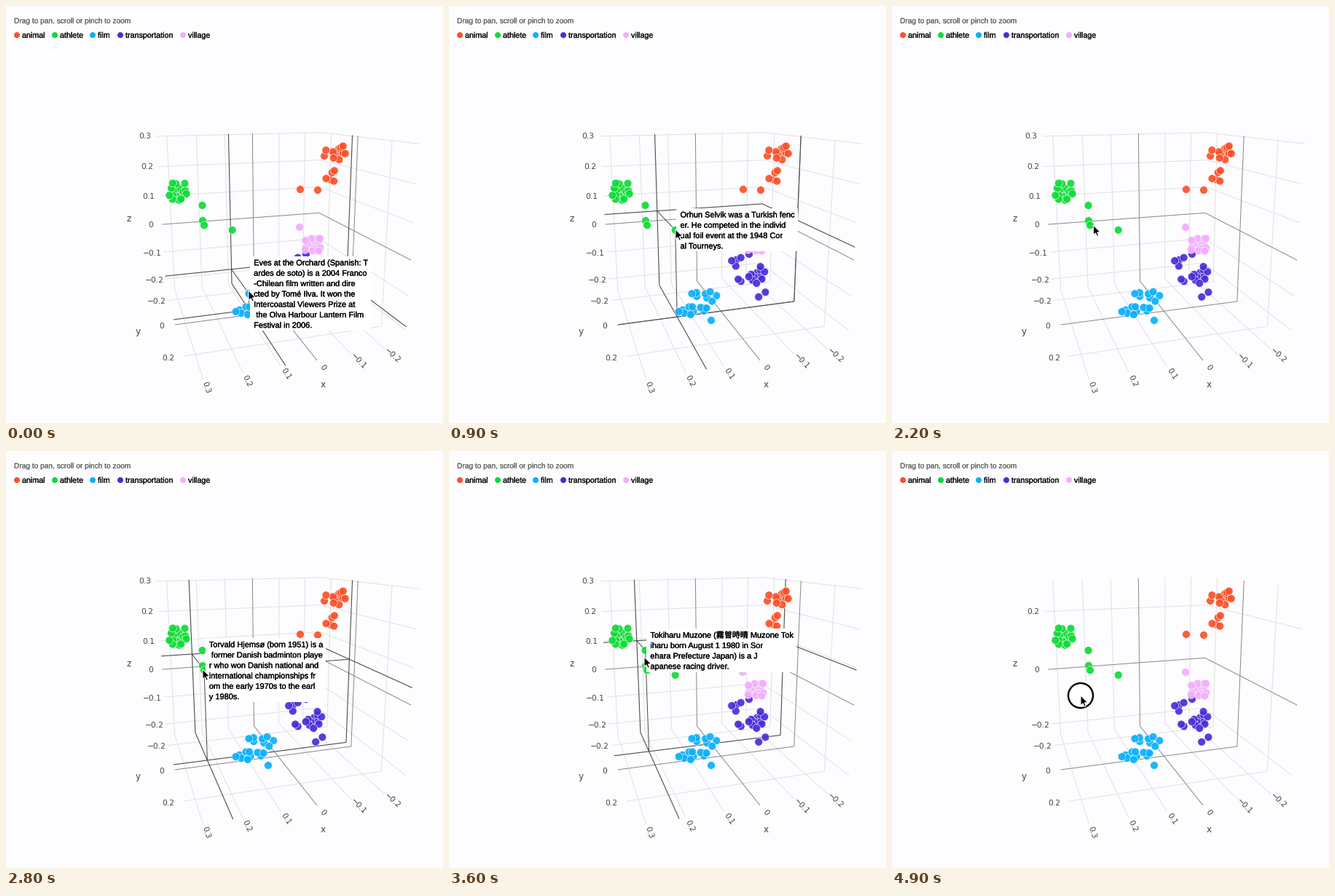
These frames come from a looping animation (600x573 px, 5000 ms). A matplotlib script:

```python
import math
import numpy as np
import matplotlib.pyplot as plt
from matplotlib.animation import FuncAnimation
from matplotlib.patches import Circle, Polygon, Rectangle
from matplotlib.patheffects import withStroke

W, H, DPI = 600, 573, 100
FRAMES, INTERVAL = 50, 100
PX = 72 / DPI
ROW = 14.3
SANS = ["Liberation Sans", "Noto Sans CJK JP"]
GRID, ZERO, SPIKE = "#e1e0e4", "#88878a", "#4a4a4a"

# Perspective camera and the box of the plot, with walls on the low sides
CAMERA = np.array([[-467.7, -92, -57, 359.3],
                   [-22.5, -85.3, -462.7, 305.9],
                   [-0.18, -0.6, -0.155, 0.962]])
LOW, HIGH = (-0.263, -0.292, -0.245), (0.332, 0.327, 0.303)

rng = np.random.default_rng(4)
fig = plt.figure(figsize=(W / DPI, H / DPI), dpi=DPI, facecolor="#fdfcff")
ax = fig.add_axes([0, 0, 1, 1])
ax.set_xlim(0, W)
ax.set_ylim(H, 0)
ax.axis("off")


def project(point):
    u, v, w = CAMERA @ np.append(point, 1)
    return np.array([u / w, v / w])


def line(a, b, color, width=1, z=1):
    (x0, y0), (x1, y1) = project(a), project(b)
    return ax.plot([x0, x1], [y0, y1], color=color, lw=width * PX, zorder=z,
                   solid_capstyle="butt")[0]


def wall_lines(axis, value, color, width=1, z=1):
    """Lines at one axis value along the two walls that hold this axis."""
    lines = []
    for along in {0, 1, 2} - {axis}:
        a = np.array(LOW)
        a[axis] = value
        b = a.copy()
        b[along] = HIGH[along]
        lines.append(line(a, b, color, width, z))
    return lines


def label(x, y, text, size=10.6, **kw):
    opts = dict(ha="center", va="center", family="DejaVu Sans", color="#444", zorder=2)
    opts.update(kw)
    return ax.text(x, y, text, fontsize=size * PX, **opts)


def prose(x, y, text, size, color="black", weight=0.22, z=9):
    return label(x, y, text, size, ha="left", va="baseline", family=SANS, color=color,
                 zorder=z, path_effects=[withStroke(linewidth=weight, foreground=color)])


def dot(center, color, radius=5.4):
    ax.add_patch(Circle(center, radius, fc=color, ec="white", lw=0.45, alpha=0.92, zorder=5))


def scatter(color, cx, cy, rx=0, ry=0, count=1):
    """Spread dots evenly over an ellipse, with a little jitter."""
    turn = rng.uniform(0, math.tau)
    for i in range(count):
        r, a = math.sqrt((i + 0.5) / count), turn + 2.4 * i + rng.normal(0, 0.35)
        dot((cx + rx * r * math.cos(a), cy + ry * r * math.sin(a)), color)


# Header, legend and clusters: ellipse centre, radii, count
prose(11, 23.6, "Drag to pan, scroll or pinch to zoom", 10.15, "#666", 0.1)

CLUSTERS = [
    ("animal", "#fb5028", 15, [(457, 202, 10, 12, 11), (440, 205, 6, 8, 2),
                               (446, 235, 8, 12, 5), (404, 252), (428, 253)]),
    ("athlete", "#0ddb34", 67, [(236, 255, 13, 17, 15), (270, 295)]),
    ("film", "#09b0fe", 119, [(326, 418, 13, 7, 9), (355, 399, 21, 8, 7),
                              (349, 416, 5, 5, 4), (360, 432)]),
    ("transportation", "#4a2cd8", 157, [(395, 352, 9, 9, 4), (424, 369, 13, 13, 11),
                                        (400, 377, 4, 3, 2), (430, 398, 12, 6, 2),
                                        (412, 341)]),
    ("village", "#f1aefd", 243, [(422, 328, 14, 12, 16), (403, 304)]),
]
COLORS = {name: color for name, color, _, _ in CLUSTERS}
for name, color, key_x, blobs in CLUSTERS:
    ax.add_patch(Circle((key_x, 40), 4, fc=color, lw=0))
    prose(key_x + 7, 43.6, name, 10.7, "#111")
    for blob in blobs:
        scatter(color, *blob)

# Grid and tick labels
fine = []
for axis, step in ((0, 1), (1, 2), (2, 1)):
    for tenth in range(-2, 3 if axis == 1 else 4, step):
        value = tenth / 10
        place = np.array(LOW)
        place[axis] = value
        angle = 0
        if axis == 0:
            place[1] = 0.365
            dx, dy = project(place) - project((value, LOW[1], LOW[2]))
            angle = -math.degrees(math.atan2(dy, dx))
        else:
            place[0] = 0.371
        text = f"{value:g}".replace("-", "−")
        items = wall_lines(axis, value, GRID if tenth else ZERO, z=1 if tenth else 1.5)
        items.append(label(*project(place), text, rotation=angle))
        if axis == 2 and tenth % 2:
            fine += items

for x, y, text in ((169, 292, "z"), (181, 447, "y"), (435, 520, "x")):
    label(x, y, text, 12)


class Tooltip:
    """Hover text beside a point, with guide lines to the walls and floor."""

    def __init__(self, start, end, cluster, point, text):
        self.start, self.end = start, end
        u, v = project(point)
        dot((u, v), COLORS[cluster])
        self.items = []
        for axis in range(3):
            self.items += wall_lines(axis, point[axis], SPIKE, 1.1, 3)
            on_wall = np.array(point)
            on_wall[axis] = LOW[axis]
            self.items.append(line(point, on_wall, SPIKE, 1, 3))

        rows = text.split("\n")
        x, top = u + 6.8, v - len(rows) * ROW / 2
        texts = []
        for i, row in enumerate(rows):
            indent = 3.1 * row.startswith(" ")
            texts.append(prose(x + indent, top + ROW * (i + 0.5) + 4, row.lstrip(), 11))
        right = max(t.get_window_extent().x1 for t in texts) + 4
        box = Rectangle((x - 5, top - 1), right - x + 5, len(rows) * ROW + 2,
                        fc="white", lw=0, zorder=8)
        self.items += texts + [ax.add_patch(box)]

    def show(self, ms):
        for item in self.items:
            item.set_visible(self.start <= ms < self.end)


TOOLTIPS = [
    Tooltip(0, 200, "film", (0.087, -0.038, -0.189),
            "Eves at the Orchard (Spanish: T\nardes de soto) is a 2004 Franco\n"
            "-Chilean film written and dire\ncted by Tomé Ilva. It won the\n"
            "Intercoastal Viewers Prize at\n the Olva Harbour Lantern Film\n"
            "Festival in 2006."),
    Tooltip(800, 2000, "athlete", (0.146, 0, 0.035),
            "Orhun Selvik was a Turkish fenc\ner. He competed in the individ\n"
            "ual foil event at the 1948 Cor\nal Tourneys."),
    Tooltip(2300, 3300, "athlete", (0.225, -0.038, 0.047),
            "Torvald Hjemsø (born 1951) is a\n former Danish badminton playe\n"
            "r who won Danish national and\ninternational championships fr\n"
            "om the early 1970s to the earl\ny 1980s."),
    Tooltip(3400, 4300, "athlete", (0.217, -0.109, 0.094),
            "Tokiharu Muzone (霧曽時晴 Muzone Tok\niharu born August 1 1980 in Sor\n"
            "ehara Prefecture Japan) is a J\napanese racing driver."),
    Tooltip(4400, 4700, "athlete", (0.289, -0.056, 0.128),
            "Curt Wexdale (born 15 November\n1969) is an Australian rules f\n"
            "ootballer. He played for both\n the Tarrowick and Quenderby Fo\n"
            "otball Clubs in the Wattlemoor\n Football Circuit."),
]

# Pointer: arrival, departure and place of each rest
ARROW = np.array([(0, 0), (0, 13.5), (3.1, 10.8), (5.2, 15.3), (7.4, 14.3),
                  (5.4, 9.9), (9.6, 9.6)])
RESTS = [(0, 0, 333, 391), (400, 400, 315, 338), (700, 1900, 311, 307),
         (2300, 3100, 270, 300), (3400, 4200, 268, 283), (4400, 4600, 243, 263),
         (4900, 5000, 259, 336)]
pointer = ax.add_patch(Polygon(ARROW, fc="black", ec="white", lw=0.75, zorder=12))
ring = ax.add_patch(Circle(RESTS[-1][2:], 17, fc="white", ec="black", lw=2.4 * PX, zorder=11))


def pointer_at(ms):
    for (_, leave, *a), (arrive, _, *b) in zip(RESTS, RESTS[1:]):
        if ms <= arrive:
            u = max(0, (ms - leave) / (arrive - leave))
            return np.array(a) + u * u * (3 - 2 * u) * np.subtract(b, a)


def update(k):
    ms = k * INTERVAL
    pressed = ms >= RESTS[-1][0]
    for tip in TOOLTIPS:
        tip.show(ms)
    for item in fine:
        item.set_visible(not pressed)
    ring.set_visible(pressed)
    pointer.set_xy(ARROW + pointer_at(ms))
    return []


anim = FuncAnimation(fig, update, frames=FRAMES, interval=INTERVAL,
                     repeat=True, repeat_delay=0, blit=False)
plt.show()
```
